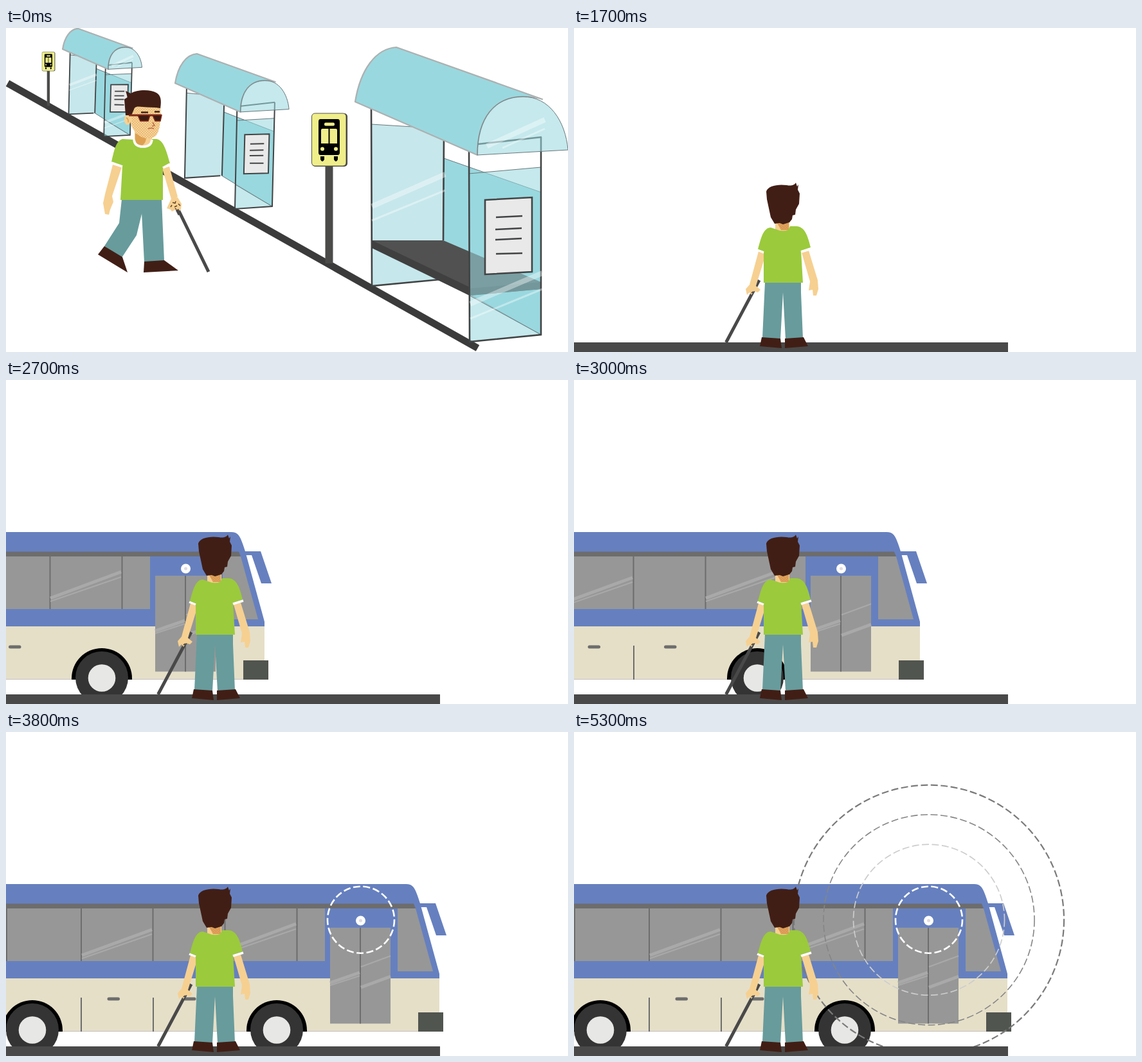
An HTML page that plays this animation: 874x505 px, repeating every 5.8 s.

```html
<!DOCTYPE html>
<html lang="en">
<head>
<meta charset="utf-8">
<title>Bus stop guidance</title>
<style>
  html, body { margin: 0; width: 100%; height: 100%; overflow: hidden; background: #fff; }
  svg { display: block; width: 100vw; height: 100vh; }
  [data-from] { visibility: hidden; }
  .shelter * { vector-effect: non-scaling-stroke; }
  .frame { fill: none; stroke: #424344; }
  .thin { fill: none; stroke: #68777b; stroke-width: 1; }
  .roof { fill: #9ad8df; stroke: #adb0b1; stroke-width: 2.2; stroke-linejoin: round; }
  .glass { fill: rgba(154, 216, 223, .57); }
  .shine { fill: none; stroke: #fff; stroke-opacity: .38; }
  .hair { fill: #411e15; }
  .skin { fill: #f6d091; }
  .shirt { fill: #9bca3c; }
  .pants { fill: #689b9c; }
  .cuff { fill: none; stroke: #fff; stroke-width: 3.5; }
  .cane { stroke: #494949; stroke-width: 5; }
  .pane { fill: #979797; }
  .trim { fill: none; stroke: #6d6d6d; stroke-width: 2; }
  .gloss { fill: none; stroke: #a9a9a9; }
  .wave { fill: none; }
</style>
</head>
<body>
<svg viewBox="0 0 874 505" preserveAspectRatio="none">
  <defs>
    <pattern id="stubble" width="4" height="4" patternUnits="userSpaceOnUse">
      <path d="M0 1h1M2 3h1" stroke="#c98a4b" stroke-width="1"/>
    </pattern>
    <g id="sign">
      <path d="M502.500 214V367" stroke="#4b4b4a" stroke-width="12"/>
      <rect x="476" y="133" width="55" height="83" rx="5" fill="#454540"/>
      <rect x="475.500" y="133" width="53.500" height="82" rx="5" fill="#efee8a" stroke="#55554a"/>
      <path d="M489 142h27q3 0 3 4v48q0 4-3 4h-27q-3 0-3-4v-48q0-4 3-4z"/>
      <path d="M489 200h6v5q-3 6-6 0zM510 200h6v5q-3 6-6 0z"/>
      <g fill="#efee8a">
        <rect x="495" y="147.500" width="16" height="5" rx="2"/>
        <path d="M490 159q0-2 2-2h9.500v23h-11.500zM503.500 157h9.500q2 0 2 2v21h-11.500z"/>
        <circle cx="492" cy="188.500" r="3"/><circle cx="513" cy="188.500" r="3"/>
      </g>
    </g>
  </defs>

  <g data-from="0" data-to="1700">
    <g id="rings"></g>
    <path d="M2.500 86L733.500 499" stroke="#3b3b3b" stroke-width="11"/>
    <use href="#sign" transform="translate(-118.500 -10.500) scale(.367 .36)"/>
    <use href="#sign"/>
    <g id="shelters"></g>

    <g id="walker">
      <path class="skin" d="M166 213l14 4-15 45 2 9-5 12-2 8-6-1-3-17 3-14z"/>
      <path class="skin" d="M243 219l11-3 13 47-9 7z"/>
      <path class="skin" d="M200 160h27v16q-2 9-14 9-11 0-13-9z"/>
      <path fill="#dda052" d="M201 164l17 8q-1 9-7 11-8-1-10-7z"/>
      <path class="pants" d="M180 267h31v23l-8 33-23 35-27-18 23-36z"/>
      <path class="pants" d="M208 267h34l4 96-31 2-4-77z"/>
      <path class="hair" d="M153 340l28 17 8 24-46-28zM215 364l31-2 22 16-54 3z"/>
      <path class="shirt" d="M181 173C172 176 169 186 164 209l17 6-3 53h66v-50l11-7C249 190 245 175 234 173h-7q0 12-14 12-12 0-14-11z"/>
      <path class="cuff" d="M164 210l17 6M244 218l11-6M199 174q1 11 14 11 13 0 14-11"/>
      <ellipse class="skin" cx="189" cy="143" rx="5" ry="8"/>
      <path d="M187 140q4 2 3 7" fill="none" stroke="#dda052" stroke-width="1.500"/>
      <path id="face" class="skin" d="M193 118h47c1 16 1 36-5 47-4 9-20 9-29 2-9-7-14-18-14-31z"/>
      <path fill="url(#stubble)" d="M197 122h43c1 16 1 33-5 43-4 9-20 9-29 2-7-6-10-15-11-24z"/>
      <path class="hair" d="M186 136l-2-25 5-3-3-10 8 4c9-6 30-7 40-1 7 4 8 12 6 24-9-2-18-1-27-2-8-1-13-1-14 4l-4 9z"/>
      <path d="M210 131.500h11M231 130.500h8" stroke="#411e15" stroke-width="2.500"/>
      <path d="M191 136h51" stroke="#7d2818" stroke-width="3"/>
      <path fill="#3c1912" stroke="#7d2818" stroke-width="1.500" d="M205 136h19l-3 9h-12zM228 136h14l-2 9h-8z"/>
      <path d="M221 157q5-2 9 0M228 147l3 5-4 1" fill="none" stroke="#bd6848" stroke-width="1.500"/>
      <path class="cane" d="M262 271L315 380"/>
      <path class="skin" d="M257 266l10-2 6 10-1 9-5 4-3-4-6 3-2-3-6-2z"/>
      <path class="cane" d="M266 283l4 8"/>
      <path d="M259 272l4 1 1-3m-2 9 4-2m-10 2 2-3m10-2 3 3m-8 4 2 2" stroke="#5f4328" stroke-width="1.500" fill="none"/>
    </g>
  </g>

  <g data-from="1700" data-to="5800">
    <g id="bus" data-from="2200" data-to="5800">
      <path fill="#e5dfc8" d="M0 383h674v83.500H0z"/>
      <path d="M0 466.500h674" stroke="#c6bfc0"/>
      <path fill="#6680bf" d="M0 237h622c13 0 15 9 22 30l29 106 1 4v7H0z"/>
      <path fill="#6680bf" d="M641 267h27l17 50h-16l-15-44h-12z"/>
      <path fill="#6d6d6d" d="M0 267.500h634l3 7.500H0z"/>
      <path class="pane" d="M0 275h496v82H0zM504 305h94v149.500h-94zM609 275h28l27 98h-55z"/>
      <path class="trim" d="M1 275v82M117 275v82M228.500 275v82M340.500 275v82M452.500 275v82M551 305v149.500M117 414v53M229 414v53"/>
      <g class="gloss" stroke-width="5">
        <path d="M118 348l109-40M341 340l110-41M504 391l46-16M552 398l46-17"/>
      </g>
      <g class="gloss" stroke-width="2">
        <path d="M118 353l109-38M341 345l110-38M504 395l46-15M552 366l46-17"/>
      </g>
      <path class="trim" style="stroke-width:5;stroke-linecap:round" d="M160 416h14.500M278.500 416h14.500"/>
      <circle cx="551.500" cy="294" r="7.500" fill="#fff"/>
      <circle cx="551.500" cy="294" r="2.500" fill="#e2dce3"/>
      <path fill="#51554f" d="M641 437h39v30h-39z"/>
      <g id="wheels"></g>
    </g>
    <g id="waves"></g>
    <path fill="#4a4949" d="M0 490h675v15H0z"/>

    <g id="waiting">
      <path class="cane" d="M288 393L236.500 490"/>
      <path class="skin" d="M287 348l9 4-1 11-12 39 7 6-4 4-6-2-4 6-3-4-4 4-2-9 6-7z"/>
      <path class="skin" d="M354 350l11-3 14 46 1 14-3 10h-5l-1-9-6 1 2-14z"/>
      <path d="M276 413l3-2" stroke="#4a4949" stroke-width="2"/>
      <path class="skin" d="M313 303h22v14h-22z"/>
      <path fill="#dfa059" d="M316 304h18v11h-12z"/>
      <path fill="url(#stubble)" d="M316 304h18v11h-12z"/>
      <path class="pants" d="M297 396h56v16l3 72-27 1-4-73-4 73-28-2z"/>
      <path class="hair" d="M292 482l29 2 2 15-34-3zM328 484l29-2 7 14-36 3z"/>
      <path class="shirt" d="M306 311c-11 1-14 12-20 34l9 3v49h61l-3-50 15-5c-5-21-10-32-22-33h-10l-3 6q-10 3-18-1z"/>
      <path class="cuff" d="M285 346l10 4M353 349l16-5"/>
      <path class="hair" d="M299 255c2-9 18-12 32-10 5 1 11 1 14-4l2 6 2-3-1 8 3 6-1 16-5 9-1 8-4 1-1 6-4 5-10 3-5-2-8 1-6-10-6-28z"/>
    </g>
  </g>
</svg>

<script>
const LOOP = 5800, BUS_START = 2200, BUS_STEP = 100, BUS_STEPS = 11, BUS_STRIDE = 45.33;
const byId = id => document.getElementById(id);
const fill = (id, items, draw) => { byId(id).innerHTML = items.map(draw).join(''); };

// Ground rings spread outwards from the sign post.
fill('rings', [
  { from: 1200, rx: 242, ry: 56, color: '#a59f8f' },
  { from: 700, rx: 165, ry: 38, color: '#ccc5b4' },
  { from: 200, rx: 82, ry: 18.5, color: '#e5dfc8' }
], r => `<ellipse data-from="${r.from}" data-to="1700" cx="500" cy="362" rx="${r.rx}" ry="${r.ry}" fill="${r.color}"/>`);

// Sound waves from the speaker above the bus door.
fill('waves', [
  { from: 3800, r: 52, color: '#fff', width: 2.6 },
  { from: 4300, r: 117.5, color: '#cdcdcd', width: 1.7 },
  { from: 4800, r: 164, color: '#858585', width: 1.6 },
  { from: 5300, r: 210, color: '#7a7a7a', width: 2.2 }
], w => `<circle class="wave" data-from="${w.from}" data-to="${LOOP}" cx="552" cy="292.7" r="${w.r}"
  stroke="${w.color}" stroke-width="${w.width}" stroke-dasharray="11 4.5"/>`);

fill('wheels', [41, 421], x => `<path d="M${x - 47} 467v-2a47 47 0 0 1 94 0v2z"/>
  <circle cx="${x}" cy="464" r="41" fill="#343434"/><circle cx="${x}" cy="464.500" r="21.300" fill="#e7e7e5"/>`);

const shine = (d, width) => `<path class="shine" d="${d}" stroke-width="${width}"/>`;

function shelter({ body, roof, post, bench, gleam }) {
  const seat = `<path fill="#515151" d="M569 331h111l152 65v11l-111 10-152-76z"/>
    <path fill="#404040" d="M569 331l152 73v13l-152-74zM721 406l111-10v11l-111 10z"/>`;
  const bodyShine = shine('M569 278L683 228', 8 * gleam) + shine('M569 300L683 253', 3 * gleam);
  const panelShine = shine('M722 430L834 382', 8 * gleam) + shine('M722 453L834 407', 3 * gleam);
  const roofShine = shine('M748 184L838 143', 8 * gleam) + shine('M772 187L838 157', 3 * gleam);
  return `<g class="shelter" stroke-width="${post}">
    <g transform="matrix(${body})">
      <path fill="#b8e1e6" fill-opacity=".8" d="M568 150L681 157 680 392 569 402z"/>
      <path fill="#9ad8df" d="M681 203L832 256V478L680 392z"/>
      <path class="thin" d="M568 150L681 157M681 203L832 256M680 392L832 478"/>
      <path class="frame" d="M568 122L569 402 675 392M681 165L680 ${bench ? 331 : 392}"/>
      ${gleam ? bodyShine : ''}${bench ? seat : ''}
      <path class="glass" d="M720 227L832 217V478L721 489z"/>
      <path class="thin" d="M720 227L832 217M721 417L832 478"/>
      <path class="frame" d="M720 185L721 489 832 478V170"/>
      <path class="frame" fill="#e9e9e9" style="fill:#e9e9e9" d="M745 268l73-4v116l-73 4z"/>
      <path class="frame" d="M762 295l41-2M761 314l41-2M761 330l41-2M762 352l41-1"/>
      ${gleam ? panelShine : ''}
    </g>
    <g transform="matrix(${roof})">
      <path class="roof" d="M543 115C551 65 575 32 607 30L834 111C823 107 812 107 804 107 760 107 733 140 733 198z"/>
      <path class="frame" d="M734 181L833 170"/>
      <path class="glass" d="M733 198C733 140 760 107 804 107 845 107 870 145 874 190z"/>
      <path class="thin" d="M733 198C733 140 760 107 804 107 845 107 870 145 874 190z"/>
      ${gleam ? roofShine : ''}
    </g>
  </g>`;
}

fill('shelters', [
  { body: '.366 .018 -.01 .367 -106.8 -23.4', roof: '.373 0 0 .378 -114.5 -10.5', post: 1.8, gleam: .5 },
  { body: '.521 .016 -.013 .526 -13.3 13.3', roof: '.535 0 0 .54 -27.5 24', post: 2, gleam: 0 },
  { body: '1 0 0 1 0 0', roof: '1 0 0 1 0 0', post: 2.6, gleam: 1, bench: true }
], shelter);

const timed = [...document.querySelectorAll('[data-from]')].map(el =>
  ({ el, from: +el.dataset.from, to: +el.dataset.to }));
const start = performance.now();

function render() {
  const t = (performance.now() - start) % LOOP;
  for (const { el, from, to } of timed) {
    el.style.visibility = t >= from && t < to ? 'visible' : 'hidden';
  }
  const step = Math.max(0, Math.min(BUS_STEPS, Math.floor((t - BUS_START) / BUS_STEP)));
  byId('bus').setAttribute('transform', `translate(${(step - BUS_STEPS) * BUS_STRIDE} 0)`);
  requestAnimationFrame(render);
}
render();
</script>
</body>
</html>
```
